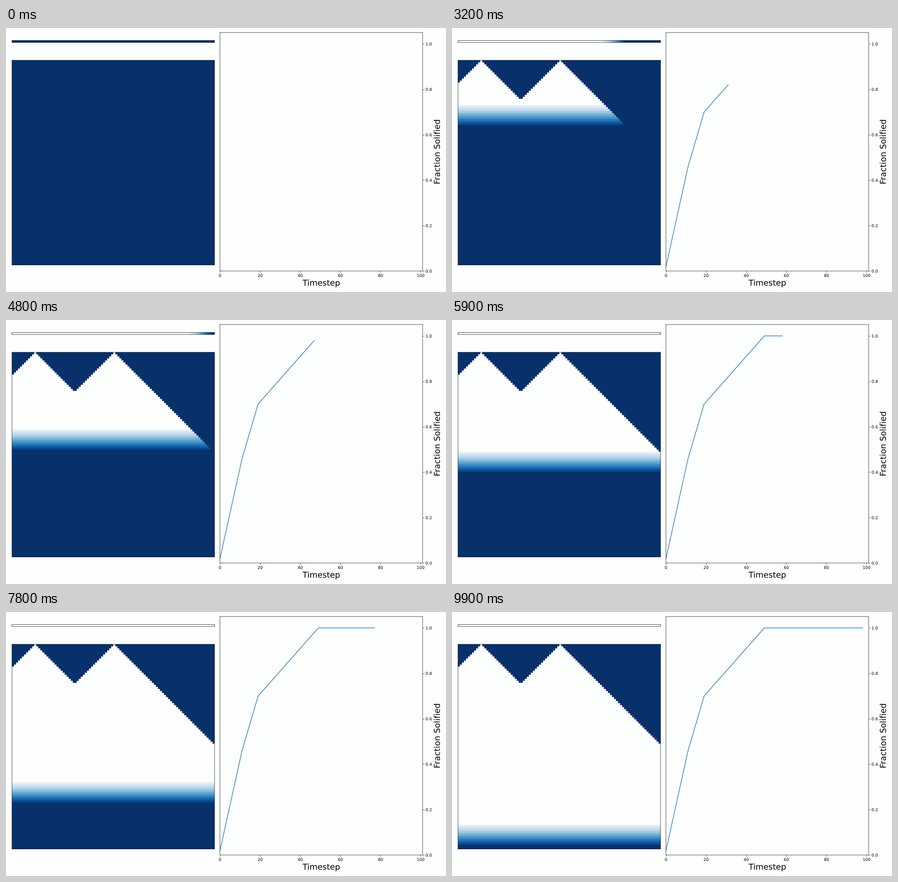
A matplotlib script that plays this animation: 966x580 px, repeating every 10000 ms.

```python
import numpy as np
import matplotlib.pyplot as plt
from matplotlib.animation import FuncAnimation
from matplotlib.patheffects import Normal

W, H, DPI = 966, 580, 64
K = 64.4 / DPI  # point scale
PAGE = "#fdfefe"
COLS, ROWS, STEPS = 100, 101, 100
SEEDS = (11, 50)
COOLING = 11  # steps from liquid to fully cooled
CELL = 7  # raster pixels per cell, smoothed down when drawn

plt.rcParams.update({
    "font.family": "DejaVu Sans",
    "font.size": 10 * K,
    "text.hinting": "none",
    "axes.labelsize": 20 * K,
    "axes.linewidth": 0.8 * K,
    "axes.facecolor": PAGE,
    "figure.facecolor": PAGE,
    "lines.linewidth": 1.5 * K,
})

# Step at which each cell solidifies: distance to the nearest seed
cells = np.arange(COLS)
freeze = np.min([np.abs(cells - s) for s in SEEDS], axis=0)
rows = np.arange(ROWS)[:, None]
solid = freeze[None, :] <= rows
steps = np.arange(STEPS)
fraction = np.array([np.mean(freeze <= t) for t in steps])

palette = plt.cm.Blues(1 - np.arange(COOLING + 1) / COOLING, bytes=True)[:, :3]
palette[-1] = [int(PAGE[i:i + 2], 16) for i in (1, 3, 5)]


def shade(age):
    state = np.clip(age + 1, 0, COOLING)
    return palette[state.repeat(CELL, axis=0).repeat(CELL, axis=1)]


def strip_pixels(t):
    return shade(t - freeze[None, :])


def history_pixels(t):
    return shade(np.where(solid, t - rows, -1))


fig = plt.figure(figsize=(W / DPI, H / DPI), dpi=DPI)


def panel(x, y, w, h):
    ax = fig.add_axes([x / W, 1 - (y + h) / H, w / W, h / H])
    for spine in ax.spines.values():
        spine.set_snap(False)
    return ax


def picture(y, h, pixels):
    ax = panel(13.1, y, 444.8, h)
    ax.set_xticks([])
    ax.set_yticks([])
    return ax.imshow(pixels, aspect="auto", interpolation="hanning")


strip = picture(27.4, 4.45, strip_pixels(-1))
history = picture(70.9, 449.8, history_pixels(-1))

chart = panel(469.8, 10, 445, 523.9)
chart.set_xlim(0, 101)
chart.set_ylim(0, 1.05)
chart.yaxis.tick_right()
chart.yaxis.set_label_position("right")
chart.set_xlabel("Timestep")
chart.set_ylabel("Fraction Solified")
curve, = chart.plot([], [], color="C0")

# Outline text keeps sub-pixel positions
for axis in (chart.xaxis, chart.yaxis):
    for text in (axis.label, *axis.get_ticklabels()):
        text.set_path_effects([Normal()])


def update(frame):
    t = frame - 1
    strip.set_data(strip_pixels(t))
    history.set_data(history_pixels(t))
    curve.set_data(steps[:frame], fraction[:frame])
    return strip, history, curve


anim = FuncAnimation(fig, update, frames=STEPS, interval=100,
                     repeat=True, repeat_delay=0)
plt.show()
```
